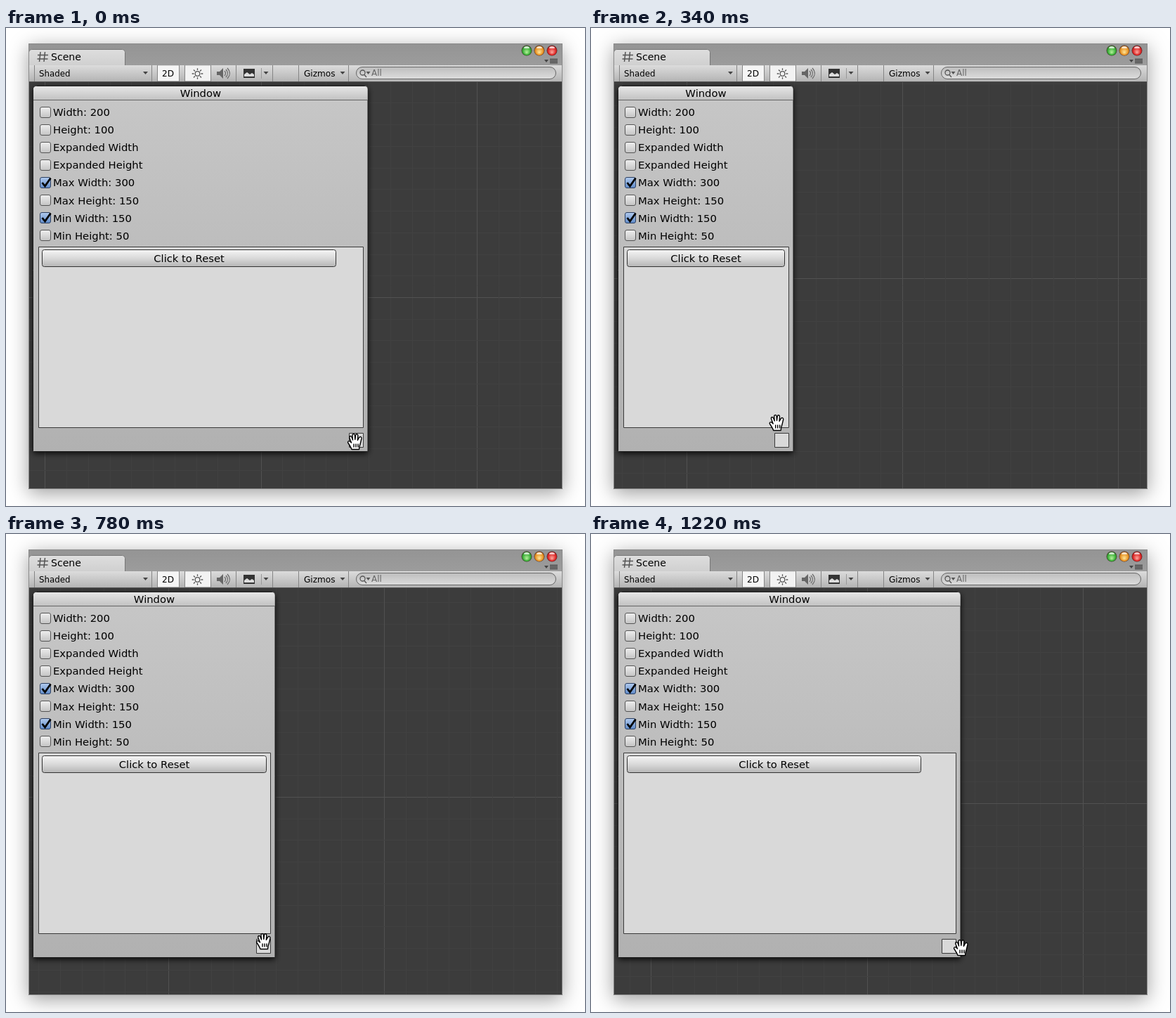
Animation, 824 px wide and 680 px high, one loop 1.24 s. Source, as an HTML page with a canvas:

```html
<!DOCTYPE html>
<html lang="en">
<head>
<meta charset="utf-8">
<title>Scene window resize</title>
<style>
  html, body { margin: 0; width: 100%; height: 100%; overflow: hidden; background: #fff; }
  canvas { display: block; }
</style>
</head>
<body>
<canvas id="stage" width="824" height="680"></canvas>
<script>
const ctx = document.getElementById('stage').getContext('2d');
const LOOP = 1240, STEP = 20, CELL = 30.73;

// Drag path: time, grid x, grid y, hand x
const path = [
  [0, 670, 383, 497], [220, 540, 363, 361], [480, 369, 353, 193], [620, 414, 356, 242],
  [780, 538, 374, 367], [1060, 664, 383, 491], [1220, 700, 383, 527]
];
const labels = ['Width: 200', 'Height: 100', 'Expanded Width', 'Expanded Height',
  'Max Width: 300', 'Max Height: 150', 'Min Width: 150', 'Min Height: 50'];
const checked = [4, 6];

const handShape = new Path2D('M-5 11C-6 8-8 5-10 2C-11.5 0-9-2-7 0L-5.5 1.5L-8-5C-9-8-6-9-5-6.5' +
  'L-3.5-2.5L-4-8.5C-4.3-11.5-1-11.8-.6-9L-.2-3L.6-9C1-11.5 4-11.2 3.8-8.5L3.4-2L5.5-5.8' +
  'C6.8-8 9.5-7 9-4.5C8 0 7 4 6 7L5.5 11Z');
const handLines = new Path2D('M-2 3V8M1 3V8M4 3V8');

function slope(i, k) {
  const d = j => (path[j + 1][k] - path[j][k]) / (path[j + 1][0] - path[j][0]);
  if (i === 0) return d(0);
  if (i === path.length - 1) return d(i - 1);
  const a = path[i][0] - path[i - 1][0], b = path[i + 1][0] - path[i][0];
  return (d(i - 1) * b + d(i) * a) / (a + b);
}

// Smooth cubic through the path points
function at(t, k) {
  let i = 0;
  while (i < path.length - 2 && t >= path[i + 1][0]) i++;
  const p = path[i], q = path[i + 1], h = q[0] - p[0], u = Math.min(1, (t - p[0]) / h), v = 1 - u;
  return p[k] * (1 + 2 * u) * v * v + q[k] * u * u * (3 - 2 * u) +
    h * u * v * (slope(i, k) * v - slope(i + 1, k) * u);
}

function shade(y0, y1, ...colors) {
  const g = ctx.createLinearGradient(0, y0, 0, y1);
  colors.forEach((c, i) => g.addColorStop(i / (colors.length - 1), c));
  return g;
}

function box(x, y, w, h, fill, stroke, radius = 0) {
  ctx.beginPath();
  ctx.roundRect(x, y, w, h, radius);
  if (fill) { ctx.fillStyle = fill; ctx.fill(); }
  if (stroke) { ctx.strokeStyle = stroke; ctx.stroke(); }
}

function stroke(d, color, width = 1) {
  ctx.strokeStyle = color;
  ctx.lineWidth = width;
  ctx.stroke(new Path2D(d));
  ctx.lineWidth = 1;
}

function fill(d, color) {
  ctx.fillStyle = color;
  ctx.fill(new Path2D(d));
}

function text(s, x, y, size, align = 'left', color = '#000') {
  ctx.font = `${size}px "DejaVu Sans", sans-serif`;
  ctx.textAlign = align;
  ctx.fillStyle = color;
  ctx.fillText(s, x, y);
}

function shadowed(blur, dy, color, draw) {
  ctx.save();
  ctx.shadowBlur = blur;
  ctx.shadowOffsetY = dy;
  ctx.shadowColor = color;
  draw();
  ctx.restore();
}

const arrow = (x, y) => fill(`M${x - 3.5} ${y - 2}h7l-3.5 4z`, '#444');

function drawFrame() {
  shadowed(26, 6, 'rgba(0,0,0,.38)', () => box(32, 22, 760, 634, '#999'));
  box(32, 22, 760, 31, shade(22, 53, '#949494', '#9c9c9c'));
  box(32.5, 30.5, 137, 26, shade(30, 54, '#dedede', '#cfcfcf'), '#777', [4, 4, 0, 0]);
  stroke('M49 34L47.5 48M55.5 34L54 48M45 38.5H60M44.5 44H59.5', '#555', 1.5);
  text('Scene', 64, 46, 14.1);

  [[741, '#2fa52f', '#b5f59a'], [759, '#e38a1b', '#ffe79a'], [777, '#d81c1c', '#ffaaa0']].forEach(([x, dark, light]) => {
    const g = ctx.createRadialGradient(x, 35, 0, x, 32, 7.5);
    g.addColorStop(0, light);
    g.addColorStop(.8, dark);
    g.addColorStop(1, '#4a3030');
    box(x - 7.5, 24.5, 15, 15, g, null, 7.5);
    fill(`M${x - 4} 29a4 3 0 0 1 8 0z`, 'rgba(255,255,255,.75)');
  });
  fill('M766 45h6l-3 4z', '#444');
  stroke('M774 44.5H785M774 47H785M774 49.5H785', '#444', 1.3);
}

function drawToolbar() {
  box(32, 53, 760, 23, shade(53, 76, '#dcdcdc', '#b4b4b4'));
  box(215, 54, 31, 21, '#f5f5f5');
  box(254, 54, 37, 21, '#f2f2f2');
  for (const x of [40, 207, 215, 246, 254, 291, 327, 379, 416, 487]) stroke(`M${x + .5} 53V76`, '#858585');
  stroke('M363.5 57V72', '#999');
  stroke('M32 76.5H792', '#555');
  text('Shaded', 47, 69, 11.8);
  text('2D', 222, 69, 12.1);
  text('Gizmos', 424, 69, 12.1);
  arrow(198.5, 64);
  arrow(370, 64);
  arrow(479, 64);

  ctx.strokeStyle = '#555';
  ctx.beginPath();
  ctx.arc(272.5, 65, 3.3, 0, 7);
  for (let i = 0; i < 8; i++) {
    const c = Math.cos(i * Math.PI / 4), s = Math.sin(i * Math.PI / 4);
    ctx.moveTo(272.5 + 5 * c, 65 + 5 * s);
    ctx.lineTo(272.5 + 7.8 * c, 65 + 7.8 * s);
  }
  ctx.lineWidth = 1.3;
  ctx.stroke();
  fill('M300 62h4l5-5v15l-5-5h-4z', '#666');
  stroke('M311 61q3 3.5 0 7M313 59q5 5.5 0 11M315 57q7 7.5 0 15', '#666', 1.2);
  box(338, 58, 16, 13, '#333');
  fill('M339 69v-3l4-3 4 3 3-2 3 2v3z', '#ddd');

  box(498.5, 55.5, 284, 17, shade(55, 73, '#bcbcbc', '#dedede'), '#666', 8.5);
  stroke('M511 63.5a3.5 3.5 0 1 1-7 0a3.5 3.5 0 1 1 7 0M510 66.5l3 3.5', '#555', 1.3);
  fill('M512.5 62h6l-3 4z', '#555');
  text('All', 520, 68, 12, 'left', '#666');
}

function drawGrid(gx, gy) {
  ctx.save();
  ctx.beginPath();
  ctx.rect(32, 77, 760, 579);
  ctx.clip();
  box(32, 77, 760, 579, '#3c3c3c');
  for (let i = -30; i <= 30; i++) {
    const x = Math.round(gx + i * CELL) + .5, y = Math.round(gy + i * CELL) + .5;
    const color = i % 10 ? '#414141' : '#515151';
    stroke(`M${x} 77V656M32 ${y}H792`, color);
  }
  ctx.restore();
}

function drawCheckbox(y, on) {
  const colors = on ? ['#b4cdf0', '#5c88c8'] : ['#f0f0f0', '#c2c2c2'];
  box(48.5, y - 7.5, 15, 15, shade(y - 8, y + 8, ...colors), on ? '#2c3f60' : '#555', 2.5);
  if (on) stroke(`M51.5 ${y}L55.5 ${y + 5}L63.5 ${y - 6.5}`, '#000', 2.8);
}

function drawWindow(right) {
  shadowed(9, 3, 'rgba(0,0,0,.9)', () => box(39, 82, right - 39, 520, '#bbb', null, [5, 5, 1, 1]));
  box(38.5, 82.5, right - 38.5, 520, shade(102, 602, '#c6c6c6', '#b1b1b1'), '#1c1c1c', [5, 5, 1, 1]);
  box(39, 83, right - 39.5, 19, shade(83, 102, '#e6e6e6', '#c2c2c2'), null, [4, 4, 0, 0]);
  stroke(`M39 102.5H${right - .5}`, '#666');
  text('Window', (39 + right) / 2, 98, 14.8, 'center');

  labels.forEach((label, i) => {
    const y = 119.7 + i * 25.1;
    drawCheckbox(Math.round(y), checked.includes(i));
    text(label, 67, y + 5.3, 14.8);
  });

  box(46.5, 311.5, right - 53, 257, '#d9d9d9', '#3a3a3a');
  ctx.save();
  ctx.beginPath();
  ctx.rect(46, 311, right - 52, 258);
  ctx.clip();
  const end = Math.max(261, Math.min(470, right - 12));
  box(51.5, 315.5, end - 52, 24, shade(316, 340, '#f4f4f4', '#d8d8d8', '#b4b4b4'), '#333', 3);
  text('Click to Reset', (51 + end) / 2, 332.5, 14.75, 'center');
  ctx.restore();

  box(right - 26.5, 576.5, 20, 20, '#d9d9d9', '#3a3a3a');
}

function drawHand(x, y) {
  ctx.save();
  ctx.translate(x, y);
  ctx.lineJoin = 'round';
  ctx.fillStyle = '#fff';
  ctx.strokeStyle = '#000';
  ctx.lineWidth = 1.4;
  ctx.fill(handShape);
  ctx.stroke(handShape);
  ctx.stroke(handLines);
  ctx.restore();
}

function render(now) {
  const t = Math.floor(now % LOOP / STEP) * STEP;
  const gx = Math.round(at(t, 1)), gy = Math.round(at(t, 2));
  ctx.lineWidth = 1;
  ctx.fillStyle = '#fff';
  ctx.fillRect(0, 0, 824, 680);
  drawFrame();
  drawToolbar();
  drawGrid(gx, gy);
  drawWindow(Math.min(526, gx - 155));
  box(32.5, 22.5, 759, 633, null, '#8a8a8a');
  drawHand(at(t, 3), gy + 205.5);
  requestAnimationFrame(render);
}
requestAnimationFrame(render);
</script>
</body>
</html>
```
